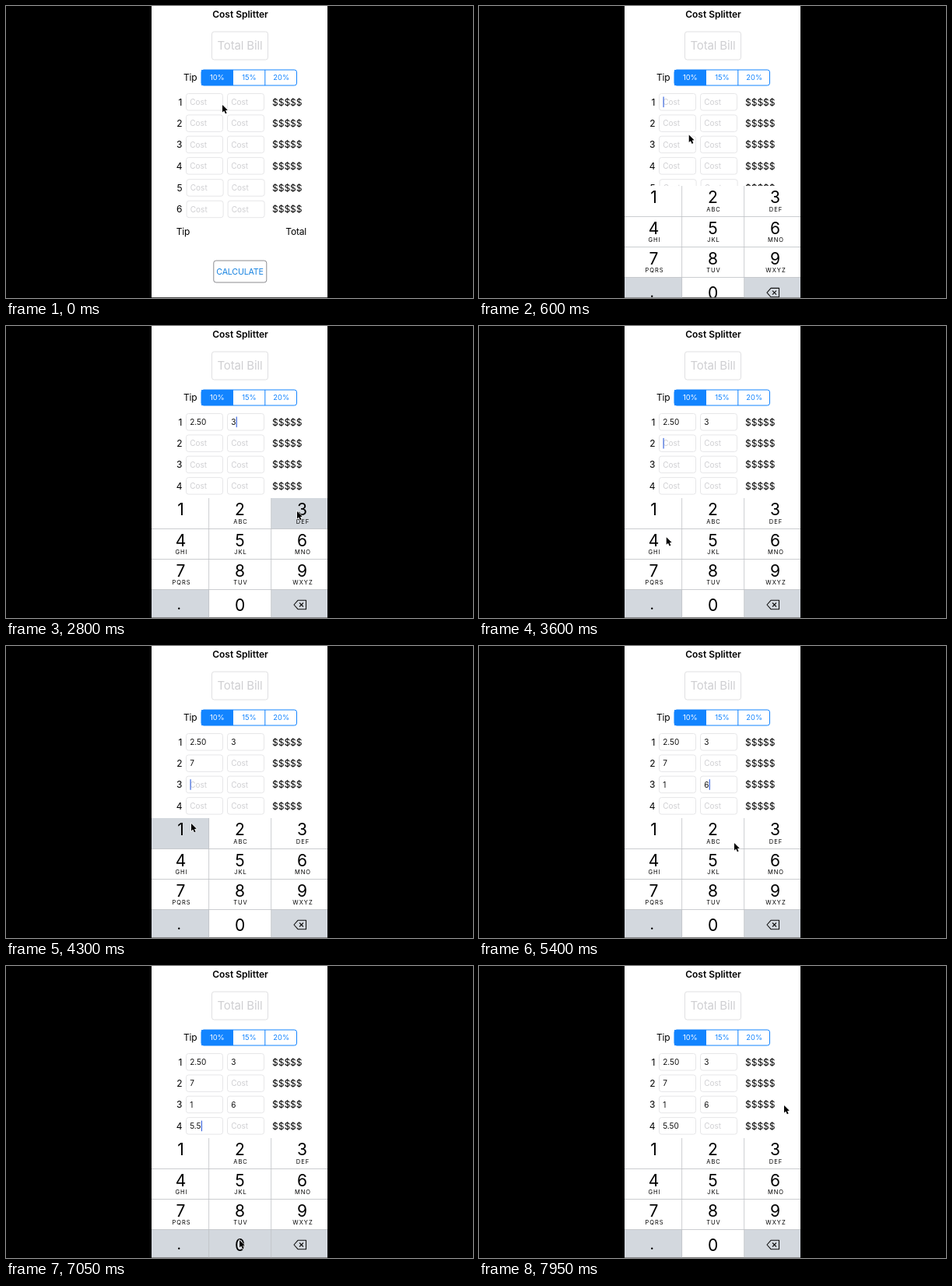
Recreate the animation shown at these times as an HTML page with a canvas. Size 600 by 375 pixels, loop 8000 ms.

```html
<!DOCTYPE html>
<html lang="en">
<head>
<meta charset="utf-8">
<title>Cost Splitter</title>
<style>
  html, body { margin: 0; width: 100%; height: 100%; overflow: hidden; background: #000; }
  canvas { display: block; width: 600px; height: 375px; }
</style>
</head>
<body>
<canvas id="stage"></canvas>
<script>
const LOOP = 8000;
const FONT = 'Inter, "Open Sans", sans-serif';
const BLUE = '#1284ff', GRAY = '#d3d8de', LINE = '#bfc2c6', HINT = '#cfcfd2';
const PRESS = 150, TYPE_DELAY = 70, FOCUS_DELAY = 50;

const canvas = document.getElementById('stage');
const ctx = canvas.getContext('2d');
const scale = window.devicePixelRatio || 1;
canvas.width = 600 * scale;
canvas.height = 375 * scale;

const rowY = [123.3, 150.7, 178, 205.4, 233.5, 261];

// Pointer stops: arrive, leave, x, y, then a key label or a [row, column] field
const stops = [
  [0, 50, 278, 127],
  [300, 420, 251, 122, [0, 0]],
  [850, 960, 300, 236, '2'],
  [1150, 1230, 236, 350, '.'],
  [1400, 1400, 299, 302],
  [1500, 1590, 300, 274, '5'],
  [1800, 1920, 300, 353, '0'],
  [2250, 2380, 296, 122, [0, 1]],
  [2700, 2850, 374, 238, '3'],
  [3250, 3400, 246, 149, [1, 0]],
  [3700, 3800, 239, 313, '7'],
  [4020, 4090, 243, 176, [2, 0]],
  [4250, 4380, 238, 228, '1'],
  [4730, 4840, 297, 176, [2, 1]],
  [5150, 5250, 367, 276, '6'],
  [5650, 5820, 245, 204, [3, 0]],
  [6150, 6260, 300, 274, '5'],
  [6450, 6570, 237, 349, '.'],
  [6780, 6870, 300, 275, '5'],
  [7040, 7290, 300, 352, '0'],
  [7900, LOOP, 392, 179]
];

const keys = [
  ['1', ''], ['2', 'ABC'], ['3', 'DEF'],
  ['4', 'GHI'], ['5', 'JKL'], ['6', 'MNO'],
  ['7', 'PQRS'], ['8', 'TUV'], ['9', 'WXYZ'],
  ['.', ''], ['0', ''], ['del', '']
];
const keyX = [187, 261, 341, 413];
const keyY = [221, 260.5, 299.5, 338.5, 374.5];

function text(str, x, y, size, { color = '#000', align = 'left', weight = 400, spacing = 0 } = {}) {
  ctx.font = `${weight} ${size}px ${FONT}`;
  ctx.letterSpacing = spacing + 'px';
  ctx.textAlign = align;
  ctx.fillStyle = color;
  ctx.fillText(str, x, y + size * 0.364);   // y is the middle of the capitals
}

function rect(x, y, w, h, color) {
  ctx.fillStyle = color;
  ctx.fillRect(x, y, w, h);
}

function box(x, y, w, h, color, radius = 3) {
  ctx.beginPath();
  ctx.roundRect(x, y, w, h, radius);
  ctx.strokeStyle = color;
  ctx.lineWidth = 1;
  ctx.stroke();
}

function polygon(points) {
  ctx.beginPath();
  points.forEach(([x, y]) => ctx.lineTo(x, y));
  ctx.closePath();
}

function stateAt(t) {
  const state = { values: {}, focus: null, edited: 0, pressed: null };
  for (const [arrive, , , , action] of stops) {
    if (!action || t < arrive) continue;
    if (Array.isArray(action)) {
      if (t < arrive + FOCUS_DELAY) continue;
      state.focus = action.join();
      state.edited = arrive + FOCUS_DELAY;
    } else {
      if (t < arrive + PRESS) state.pressed = action;
      if (t < arrive + TYPE_DELAY) continue;
      state.values[state.focus] = (state.values[state.focus] || '') + action;
      state.edited = arrive + TYPE_DELAY;
    }
  }
  return state;
}

function pointerAt(t) {
  const next = stops.findIndex(stop => stop[0] > t);
  const [, leave, x, y] = stops[(next < 0 ? stops.length : next) - 1];
  if (next < 0 || t <= leave) return [x, y];
  const [arrive, , toX, toY] = stops[next];
  const u = (t - leave) / (arrive - leave);
  const ease = u * u * (3 - 2 * u);
  return [x + (toX - x) * ease, y + (toY - y) * ease];
}

function drawField(row, col, state, t) {
  const id = `${row},${col}`;
  const value = state.values[id] || '';
  const shift = row > 3 ? 0.6 : 0;
  const x = (col ? 284.5 : 231.5) + shift, y = rowY[row];
  box(x, y - 10.8, 47, 21.5, '#e6e6e8');
  text(value || 'Cost', x + 4.7, y, 10, { color: value ? '#111' : HINT });
  if (state.focus === id && (t - state.edited) % 1000 < 600) {
    const end = value ? ctx.measureText(value).width : 0;
    rect(x + 5 + end, y - 6.8, 1.2, 13.6, '#416be0');
  }
}

function drawForm(state, t) {
  rect(187, 0, 226, 374.3, '#fff');
  text('Cost Splitter', 301, 11, 12, { align: 'center', weight: 600 });

  box(264.5, 33, 72, 36, '#e0e0e2');
  text('Total Bill', 300.5, 50.7, 15, { color: HINT, align: 'center', spacing: -0.15 });

  text('Tip', 228, 91.5, 12, { spacing: -0.2 });
  rect(251, 82, 41, 20, BLUE);
  box(251, 82, 122.5, 20, BLUE);
  rect(332.3, 82, 1, 20, BLUE);
  ['10%', '15%', '20%'].forEach((label, i) =>
    text(label, 271.3 + i * 41.2, 92, 9.3, { color: i ? BLUE : '#fff', align: 'center' }));

  rowY.forEach((y, row) => {
    text(row + 1, 226.5, y, 12, { align: 'right' });
    drawField(row, 0, state, t);
    drawField(row, 1, state, t);
    text('$$$$$', 342, y, 12);
  });

  text('Tip', 218.7, 290, 12, { spacing: -0.2 });
  text('Total', 386, 290, 12, { align: 'right', spacing: -0.2 });
  box(266.8, 327, 68, 28, '#8c8c90');
  text('CALCULATE', 300.5, 341.5, 10.7, { color: '#1682e0', align: 'center', spacing: -0.2 });
}

function drawDelete() {
  ctx.strokeStyle = '#111';
  ctx.lineWidth = 1.1;
  ctx.lineJoin = 'round';
  polygon([[370, 358], [375, 352.3], [385.5, 352.3], [385.5, 363.7], [375, 363.7]]);
  ctx.stroke();
  ctx.beginPath();
  for (const slope of [1, -1]) {
    ctx.moveTo(377, 358 - 2.5 * slope);
    ctx.lineTo(382, 358 + 2.5 * slope);
  }
  ctx.stroke();
}

function drawKeyboard(t, pressed) {
  const u = Math.min(1, Math.max(0, (t - 380) / 370));
  if (!u) return;
  ctx.save();
  ctx.beginPath();
  ctx.rect(187, 0, 226, 374.3);
  ctx.clip();
  ctx.translate(0, 154 * (1 - u) ** 3);
  rect(187, 221, 226, 154, '#fff');
  keys.forEach(([label, letters], i) => {
    const col = i % 3, row = Math.floor(i / 3);
    const x = keyX[col], y = keyY[row];
    const special = label === '.' || label === 'del';
    if (special !== (label === pressed)) rect(x, y, keyX[col + 1] - x, keyY[row + 1] - y, GRAY);
    const middle = [224.5, 300.5, 380.5][col];
    if (label === 'del') drawDelete();
    else if (label === '.') text(label, 222.3, 357.5, 19, { align: 'center' });
    else text(label, middle, row === 3 ? 358 : y + 14.5, 21, { align: 'center' });
    text(letters, middle + 1, y + 30, 7.5, { align: 'center', spacing: 1 });
  });
  for (const x of keyX.slice(1, 3)) rect(x - 0.7, 221, 0.8, 154, LINE);
  for (const y of keyY.slice(1, 4)) rect(187, y - 0.4, 226, 0.8, LINE);
  ctx.restore();
}

function drawPointer(x, y) {
  ctx.save();
  ctx.translate(x, y);
  polygon([[0, 0], [0, 9.5], [2.2, 7.6], [3.9, 11.3], [5.6, 10.5], [4, 7], [6.8, 6.7]]);
  ctx.strokeStyle = '#fff';
  ctx.lineWidth = 1.2;
  ctx.stroke();
  ctx.fillStyle = '#000';
  ctx.fill();
  ctx.restore();
}

function frame() {
  const t = performance.now() % LOOP;
  const state = stateAt(t);
  ctx.setTransform(scale, 0, 0, scale, 0, 0);
  rect(0, 0, 600, 375, '#000');
  drawForm(state, t);
  drawKeyboard(t, state.pressed);
  drawPointer(...pointerAt(t));
  requestAnimationFrame(frame);
}
requestAnimationFrame(frame);
</script>
</body>
</html>
```
